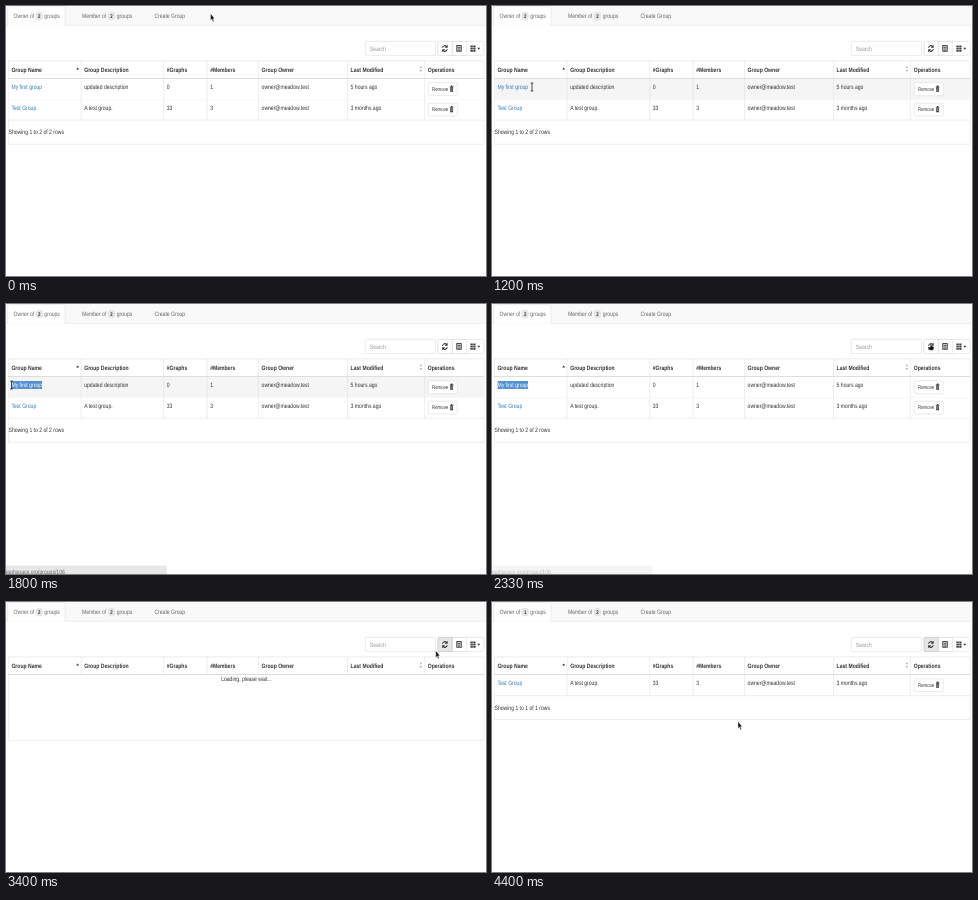
Recreate the animation shown at these times as an HTML page. Size 480 px wide and 270 px high, loop 4940 ms.

```html
<!DOCTYPE html>
<html lang="en">
<head>
<meta charset="utf-8">
<title>Groups table</title>
<style>
  html, body { margin: 0; width: 100%; height: 100%; overflow: hidden; background: #fff; }
  svg { display: block; width: 100vw; height: 100vh; }
  text {
    font: 14px "Liberation Sans", Arial, sans-serif; fill: #333;
    white-space: pre; text-rendering: geometricPrecision;
  }
  .bold { font-weight: bold; }
  .small { font-size: 12px; }
  .tab { fill: #666; }
  .badge { font-size: 12px; font-weight: bold; text-anchor: middle; }
  .link { fill: #337ab7; }
  .line { fill: none; stroke: #d4d4d4; }
  .button { fill: #fff; stroke: #ccc; }
  .icon { fill: none; stroke: #333; stroke-width: 2; }
  .solid { fill: #333; stroke: none; }
  .arrow, .hand { fill: #111; stroke: #fff; stroke-linejoin: round; }
  .ibeam { fill: none; stroke: #222; stroke-width: 2; }
</style>
</head>
<body>
<svg viewBox="0 0 1326 607" preserveAspectRatio="none">
  <defs>
    <clipPath id="picked"><rect id="pickedArea" y="173" height="18"/></clipPath>
    <g id="trash">
      <path class="solid" d="M0 2H3V0H7V2H10V4H0ZM1 5H9V14H1Z"/>
      <path d="M3.5 6V12M6.5 6V12" stroke="#fff"/>
    </g>
  </defs>

  <rect width="1326" height="43" fill="#f9f9f9"/>
  <path class="line" d="M0 43.5H1326"/>
  <path d="M4.5 44.5V5Q4.5 1.5 8.5 1.5H159Q163.5 1.5 163.5 5V44.5" fill="#fff" stroke="#d4d4d4"/>
  <g id="tabs"></g>

  <rect class="button" x="992.5" y="79.5" width="194" height="32" rx="4"/>
  <text x="1005" y="101" style="fill:#999">Search</text>
  <rect class="button" x="1193.5" y="79.5" width="127" height="32" rx="4"/>
  <rect class="button" id="listButton" x="1232.5" y="79.5" width="39" height="32"/>
  <rect class="button" id="refreshButton" x="1193.5" y="79.5" width="39" height="32" rx="3"/>
  <g class="icon">
    <path d="M1206 94A6.5 6 0 0 1 1217 91M1219 97A6.5 6 0 0 1 1208 100" stroke-width="2.6"/>
    <path class="solid" d="M1220 87V94H1212ZM1205 104V97H1213Z"/>
    <path d="M1245 89H1258V102H1245Z"/>
    <path d="M1245 89.5H1258M1247 93.5H1256M1247 96.5H1256M1247 99.5H1256"/>
    <path d="M1283 91H1297M1283 96H1297M1283 101H1297" stroke-width="4" stroke-dasharray="4 1"/>
    <path class="solid" d="M1302 94H1310L1306 98.5Z"/>
  </g>

  <rect class="line" id="frame" x="6.5" y="123.5" width="1314"/>
  <g id="head">
    <path class="line" d="M6 163H1321" stroke-width="2"/>
    <path class="solid" d="M194 143L198 138L202 143Z"/>
    <path d="M1142 140L1146 135L1150 140ZM1142 144L1146 149L1150 144Z" fill="#bbb"/>
  </g>
  <g id="rows"></g>
  <g id="selection" clip-path="url(#picked)">
    <rect x="15" y="173" width="85" height="18" fill="#5290d0"/>
    <text x="15" y="187" style="fill:#fff">My first group</text>
  </g>
  <text id="summary" x="7"></text>
  <text id="loading" x="664" y="178" text-anchor="middle">Loading, please wait...</text>

  <g id="status">
    <path d="M0 589H439Q443 589 443 593V607H0Z" fill="#e8e8e8" stroke="#d4d4d4"/>
    <text x="-1" y="606" style="fill:#666">raphspace.org/groups/106</text>
  </g>

  <g id="cursor">
    <path class="arrow" d="M0 0V16L4 12.5L6.5 18.5L9.5 17.2L7 11.5H11.5Z"/>
    <path class="ibeam" d="M-3.5 -9H3.5M-3.5 9H3.5M0 -9V9"/>
    <path class="hand" d="M-2 0Q0 -2 2 0V4L8 6Q9 9 7 14H-4L-8 8Q-7 5 -2 7Z"/>
  </g>
</svg>
<script>
const LOOP = 4940, STEP = 1000 / 15;
const SX = 1326 / 480, SY = 607 / 270, ROW = 46;
const PRESS = 2860, REFRESH = 3060, LOADED = 3860;
const dividers = [207, 435, 555, 697, 943, 1156];
const columns = [6, ...dividers].map(x => x + 9);
const $ = id => document.getElementById(id);
const show = (el, on) => { el.style.display = on ? '' : 'none'; };

const tab = (x, badge, label) => `
  <text class="tab" x="${x}" y="27">${label}</text>
  <rect x="${badge}" y="13" width="21" height="19" rx="9" fill="#e6e6e6"/>
  <text class="badge" x="${badge + 10.5}" y="27">2</text>
  <text class="tab" x="${badge + 25}" y="27">groups</text>`;

const verticals = (top, bottom) =>
  `<path class="line" d="${dividers.map(x => `M${x + .5} ${top}V${bottom}`).join('')}"/>`;
const cells = (texts, y, style) =>
  texts.map((s, i) => `<text class="${style(i)}" x="${columns[i]}" y="${y}">${s}</text>`).join('');

const row = (id, top, texts) => `<g id="${id}">
  <rect x="7" y="${top}" width="1313" height="${ROW}" fill="#fff"/>
  <path class="line" d="M6 ${top + ROW + .5}H1321"/>
  ${verticals(top, top + ROW)}
  ${cells(texts, top + 23, i => i ? '' : 'link')}
  <rect class="button" x="1166.5" y="${top + 8.5}" width="80" height="29" rx="3"/>
  <text class="small" x="1177" y="${top + 27}">Remove</text>
  <use href="#trash" x="1226" y="${top + 15}"/></g>`;

$('tabs').innerHTML = tab(21, 81, 'Owner of') + tab(210, 281, 'Member of') +
  '<text class="tab" x="410" y="27">Create Group</text>';
$('head').innerHTML += verticals(123, 163) + cells(
  ['Group Name', 'Group Description', '#Graphs', '#Members', 'Group Owner', 'Last Modified', 'Operations'],
  148, () => 'bold');
$('rows').innerHTML =
  row('first', 164, ['My first group', 'updated description', '0', '1', 'owner@meadow.test', '5 hours ago']) +
  row('second', 164 + ROW, ['Test Group', 'A test group.', '33', '3', 'owner@meadow.test', '3 months ago']);
const owned = document.querySelector('.badge');

// Each leg eases out along a quadratic curve to its end point.
const origin = [204.5, 7.5];
const legs = [
  { from: 0, to: 530, bend: [20, 190], end: [30, 79] },
  { from: 530, to: 870, bend: [30, 58], end: [40, 81] },
  { from: 1200, to: 1670, bend: [20, 81], end: [5.5, 81] },
  { from: 1870, to: 2330, bend: [220, 55], end: [438.5, 40] },
  { from: 2330, to: 2600, bend: [447, 41], end: [453, 41] },
  { from: 2600, to: 2730, bend: [448, 42], end: [443.5, 42] },
  { from: 3360, to: 4400, bend: [353, 86], end: [246, 119.5] }
];

const ramp = (t, from, to) => Math.min(1, Math.max(0, (t - from) / (to - from)));
const curve = (a, b, c, k) => a * (1 - k) ** 2 + 2 * b * k * (1 - k) + c * k * k;

function pointerAt(t) {
  return legs.reduce((at, { from, to, bend, end }) => {
    const k = 1 - (1 - ramp(t, from, to)) ** 2;
    return at.map((v, i) => curve(v, bend[i], end[i], k));
  }, origin);
}

function drawCursor(t, x, y) {
  const kind = t > 850 && t < 1900 ? 'ibeam' : x > 432 ? 'hand' : 'arrow';
  for (const el of $('cursor').children) show(el, el.classList.contains(kind));
  $('cursor').setAttribute('transform', `translate(${x * SX} ${y * SY})`);
}

function drawTable(t, x, y) {
  const loading = t >= REFRESH && t < LOADED, done = t >= LOADED;
  const count = done ? 1 : 2, shift = done ? -ROW : 0;
  show($('rows'), !loading);
  show($('summary'), !loading);
  show($('loading'), loading);
  show($('first'), !done);
  $('second').setAttribute('transform', `translate(0 ${shift})`);
  $('summary').setAttribute('y', 288 + shift);
  $('summary').textContent = `Showing 1 to ${count} of ${count} rows`;
  $('frame').setAttribute('height', 187 + shift);
  owned.textContent = count;

  ['first', 'second'].forEach((id, i) => {
    const depth = y * SY - 164 - i * ROW;
    const inside = !done && depth > 0 && depth < ROW;
    $(id).firstElementChild.style.fill = inside ? '#f5f5f5' : '#fff';
  });

  const start = t < 1250 ? 100 : t < 1670 ? Math.min(100, x * SX) : 15;
  $('pickedArea').setAttribute('x', start);
  $('pickedArea').setAttribute('width', 100 - start);
  show($('selection'), t < REFRESH);
}

function drawButtons(t, x) {
  const pressed = t >= PRESS && t < REFRESH;
  const lit = t >= REFRESH || (x > 440 && x < 446);
  const refresh = $('refreshButton').style;
  refresh.fill = pressed ? '#d4d4d4' : lit ? '#e6e6e6' : '#fff';
  refresh.stroke = pressed || lit ? '#adadad' : '#ccc';
  $('listButton').style.fill = x >= 446 ? '#e6e6e6' : '#fff';
}

function draw(now) {
  const t = Math.floor((now % LOOP + 4) / STEP) * STEP;
  const [x, y] = pointerAt(t);
  drawCursor(t, x, y);
  drawTable(t, x, y);
  drawButtons(t, x);
  $('status').style.opacity = ramp(t, 1330, 1470) * (1 - ramp(t, 2200, 2430));
}

const began = performance.now();
function tick() {
  draw(performance.now() - began);
  requestAnimationFrame(tick);
}
tick();
</script>
</body>
</html>
```
